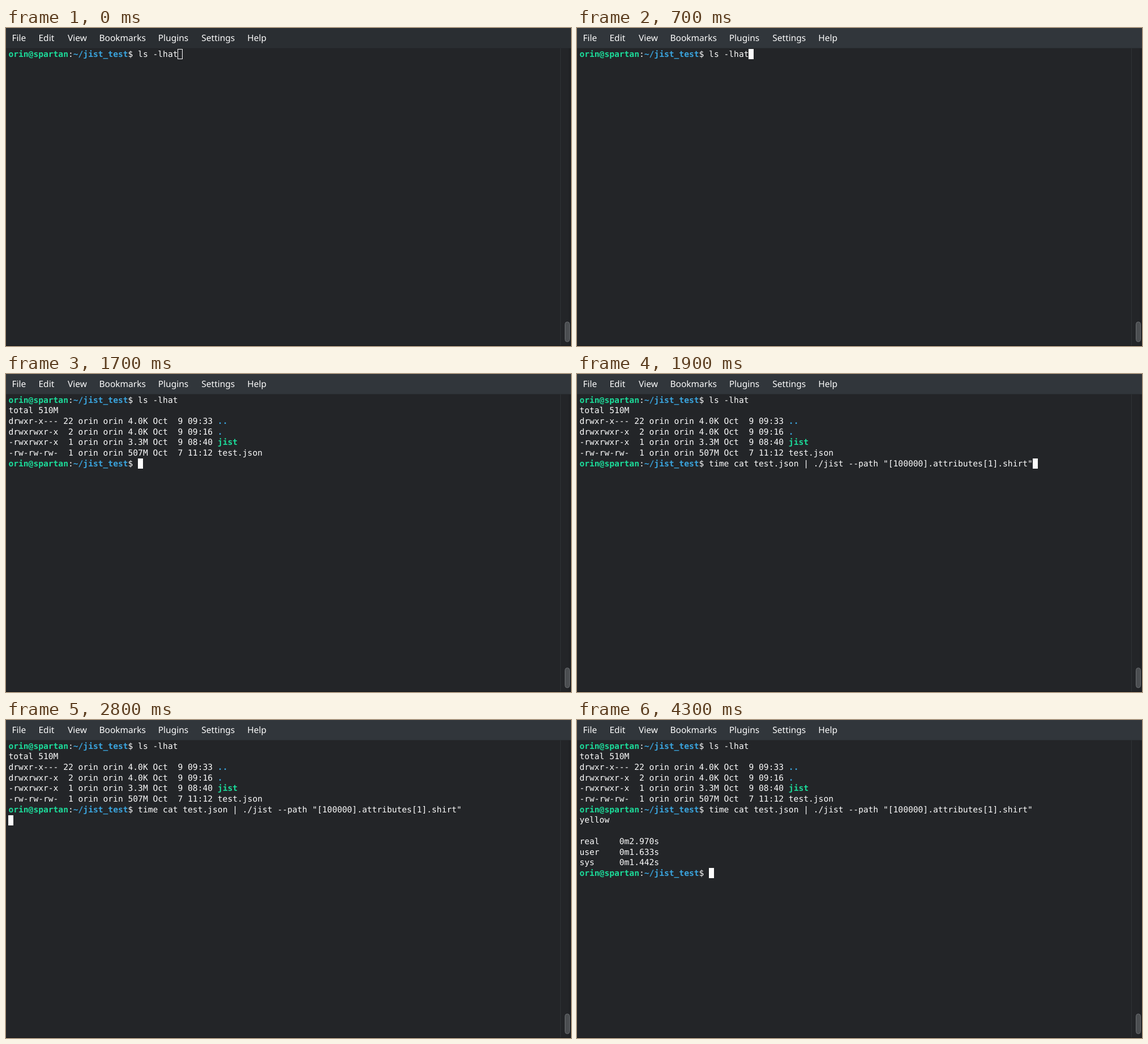
Write an HTML page with a canvas that moves like this. It is 998 px wide and 561 px high and loops after 5100 ms.

```html
<!DOCTYPE html>
<html lang="en">
<head>
<meta charset="utf-8">
<title>Terminal session</title>
<style>
  html, body { margin: 0; width: 100%; height: 100%; overflow: hidden; background: #232528; }
  canvas { display: block; }
</style>
</head>
<body>
<canvas id="stage" width="998" height="561"></canvas>
<script>
const ctx = document.getElementById('stage').getContext('2d');
ctx.textRendering = 'geometricPrecision';

const LOOP = 5100;
const FOCUS_AT = 600, LIST_AT = 1100, COMMAND_AT = 1900;
const RUN_AT = 2800, ANSWER_AT = 4200, TIMING_AT = 4300;

const LEFT = 4.4, TOP = 37, CELL = 8.797, ROW = 18.7;
const MONO = '14.613px "DejaVu Sans Mono", monospace';
const WHITE = '#fcfcfc', GREEN = '#1cdc9a', BLUE = '#3aa5df';

const MENU = [
  ['File', 10.5], ['Edit', 57.5], ['View', 109], ['Bookmarks', 164.5],
  ['Plugins', 268.7], ['Settings', 345.3], ['Help', 426.3]
];

const plain = text => ({ text, color: WHITE });
const green = text => ({ text, color: GREEN, bold: true });
const blue = text => ({ text, color: BLUE, bold: true });
const prompt = command =>
  [green('orin@spartan'), plain(':'), blue('~/jist_test'), plain('$ ' + command)];

const LISTING = [
  [plain('total 510M')],
  [plain('drwxr-x--- 22 orin orin 4.0K Oct  9 09:33 '), blue('..')],
  [plain('drwxrwxr-x  2 orin orin 4.0K Oct  9 09:16 '), blue('.')],
  [plain('-rwxrwxr-x  1 orin orin 3.3M Oct  9 08:40 '), green('jist')],
  [plain('-rw-rw-rw-  1 orin orin 507M Oct  7 11:12 test.json')]
];
const COMMAND = 'time cat test.json | ./jist --path "[100000].attributes[1].shirt"';
const TIMING = ['', 'real    0m2.970s', 'user    0m1.633s', 'sys     0m1.442s'];

// The cursor sits at the end of the last line.
function screenAt(time) {
  const lines = [prompt('ls -lhat')];
  if (time >= LIST_AT) lines.push(...LISTING, prompt(time >= COMMAND_AT ? COMMAND : ''));
  if (time >= ANSWER_AT) lines.push([plain('yellow')]);
  if (time >= TIMING_AT) lines.push(...TIMING.map(text => [plain(text)]), prompt(''));
  else if (time >= RUN_AT) lines.push([]);
  return lines;
}

function rect(color, x, y, width, height) {
  ctx.fillStyle = color;
  ctx.fillRect(x, y, width, height);
}

function drawWindow(time) {
  rect('#232528', 0, 0, 998, 561);
  const header = time < FOCUS_AT ? '#2a2e32' : time < FOCUS_AT + 100 ? '#2e3237' : '#31363b';
  rect(header, 0, 0, 998, 35.5);

  ctx.fillStyle = WHITE;
  ctx.font = '15.5px "Noto Sans", sans-serif';
  for (const [label, x] of MENU) ctx.fillText(label, x, 23);

  rect('#303336', 979, 36, 1, 525);
  rect('#1f2124', 994, 36, 4, 525);
  rect('#17191b', 0, 560, 998, 1);
  ctx.beginPath();
  ctx.roundRect(987.5, 518.5, 8, 35, 4);
  ctx.fillStyle = '#4b4e51';
  ctx.fill();
  ctx.strokeStyle = '#6b6e71';
  ctx.lineWidth = 1;
  ctx.stroke();
}

function drawTerminal(time) {
  const lines = screenAt(time);
  let column = 0;
  lines.forEach((line, row) => {
    column = 0;
    for (const { text, color, bold } of line) {
      ctx.font = (bold ? 'bold ' : '') + MONO;
      ctx.fillStyle = color;
      ctx.fillText(text, LEFT + column * CELL, TOP + 13.5 + row * ROW);
      column += text.length;
    }
  });

  const x = Math.round(LEFT + column * CELL);
  const y = Math.round(TOP + (lines.length - 1) * ROW);
  if (time >= FOCUS_AT) {
    rect(WHITE, x, y, 9, 18);
  } else {
    ctx.strokeStyle = WHITE;
    ctx.strokeRect(x + 0.5, y + 0.5, 8, 17);
  }
}

function frame() {
  const time = performance.now() % LOOP;
  drawWindow(time);
  drawTerminal(time);
  requestAnimationFrame(frame);
}
frame();
</script>
</body>
</html>
```
